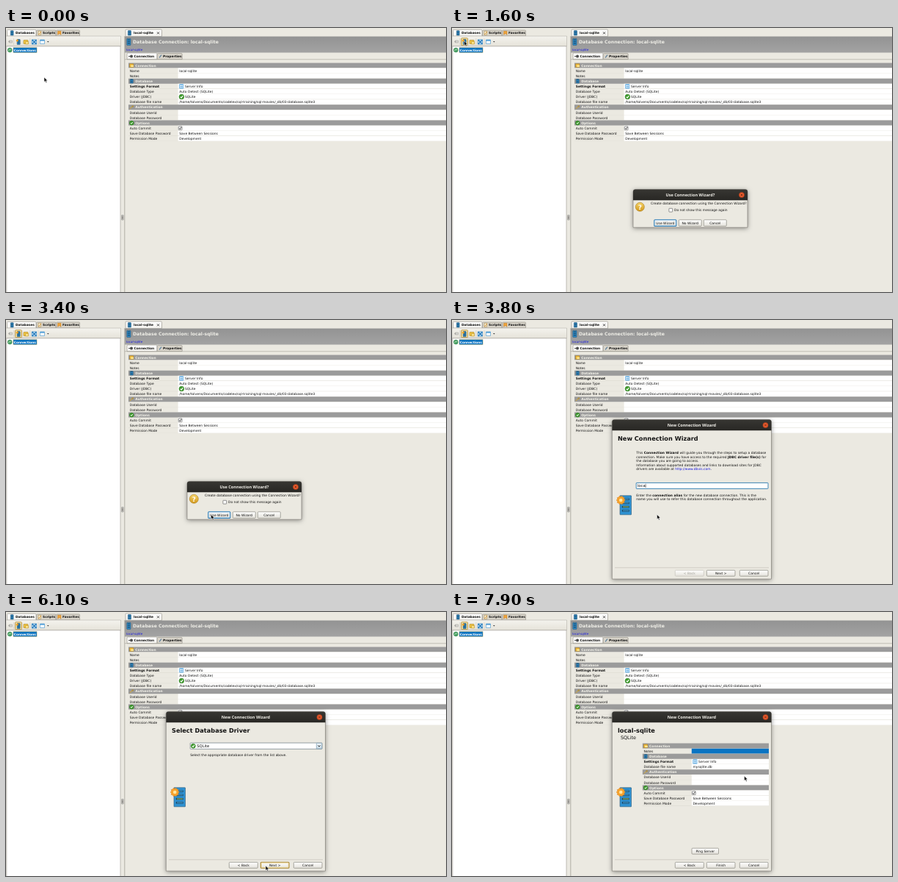
Recreate the animation shown at these times as an HTML page with a canvas. Size 600 by 359 pixels, loop 8000 ms.

```html
<!DOCTYPE html>
<html lang="en">
<head>
<meta charset="utf-8">
<title>New connection wizard</title>
<style>
  html, body { margin: 0; width: 100%; height: 100%; overflow: hidden; background: #ebe9e1; }
  canvas { display: block; width: 600px; height: 359px; }
</style>
</head>
<body>
<canvas id="stage"></canvas>
<script>
const W = 600, H = 359, LOOP = 8000, STEP = 100;
const SANS = '"DejaVu Sans", sans-serif';
const TITLE = '"Noto Sans", "Open Sans", sans-serif';
const BODY = 4.46, TAB = 4.35;
const PANEL = '#ebe9e1', LINE = '#aaa79e', SELECT = '#0a73c2';
const ROW = 7.11;

const canvas = document.getElementById('stage');
const ctx = canvas.getContext('2d');
const dpr = window.devicePixelRatio || 1;
canvas.width = W * dpr;
canvas.height = H * dpr;
ctx.scale(dpr, dpr);

function box(x, y, w, h, fill, stroke, radius = 0, lineWidth = .6) {
  ctx.beginPath();
  ctx.roundRect(x, y, w, h, radius);
  if (fill) { ctx.fillStyle = fill; ctx.fill(); }
  if (stroke) { ctx.strokeStyle = stroke; ctx.lineWidth = lineWidth; ctx.stroke(); }
}

function disc(x, y, r, fill, stroke) {
  ctx.beginPath();
  ctx.arc(x, y, r, 0, 2 * Math.PI);
  ctx.fillStyle = fill;
  ctx.fill();
  if (stroke) { ctx.strokeStyle = stroke; ctx.lineWidth = .6; ctx.stroke(); }
}

function path(points, color, lineWidth = .8, fill) {
  ctx.beginPath();
  points.forEach(([x, y]) => ctx.lineTo(x, y));
  if (fill) { ctx.closePath(); ctx.fillStyle = fill; ctx.fill(); }
  if (color) { ctx.strokeStyle = color; ctx.lineWidth = lineWidth; ctx.stroke(); }
}

function vertical(y0, y1, ...colors) {
  const g = ctx.createLinearGradient(0, y0, 0, y1);
  colors.forEach((c, i) => g.addColorStop(i / (colors.length - 1), c));
  return g;
}

// y is the middle of the capitals; small type is laid out large for even spacing
function text(str, x, y, { size = BODY, color = '#111', style = '', family = SANS, align = 'left' } = {}) {
  const zoom = 10;
  ctx.save();
  ctx.translate(x, y + size * .365);
  ctx.scale(1 / zoom, 1 / zoom);
  ctx.font = `${style} ${size * zoom}px ${family}`;
  ctx.textRendering = 'geometricPrecision';
  ctx.textAlign = align;
  ctx.fillStyle = color;
  ctx.fillText(str, 0, 0);
  const width = ctx.measureText(str).width / zoom;
  ctx.restore();
  return width;
}

// *bold* and _link_ spans
function rich(str, x, y) {
  for (const part of str.split(/(\*[^*]+\*|_[^_]+_)/)) {
    const mark = part[0];
    const marked = mark === '*' || mark === '_';
    x += text(marked ? part.slice(1, -1) : part, x, y, {
      style: mark === '*' ? 'bold' : '', color: mark === '_' ? '#1414e0' : '#111'
    });
  }
}

function check(x, y, r) {
  disc(x, y, r, '#3d9b2c', '#2a7a1d');
  path([[x - r * .5, y], [x - r * .1, y + r * .45], [x + r * .55, y - r * .45]], '#fff', r * .35);
}

function checkbox(x, y, checked) {
  box(x - 2.4, y - 2.4, 4.8, 4.8, '#fff', '#666', .5, .7);
  if (checked) path([[x - 1.4, y], [x - .3, y + 1.3], [x + 1.7, y - 1.6]], '#222', .9);
}

function server(x, y, w, h, bars = 3) {
  box(x, y, w, h, '#2f92d2', '#2b5673', .5);
  for (let i = 0; i < bars; i++) {
    box(x + w * .18, y + h * (.14 + i * .8 / bars), w * .64, h * .4 / bars, '#1c4766');
  }
}

function listIcon(x, y) {
  box(x - 2.6, y - 2.7, 5.2, 5.4, '#fff', '#3b98dc', 0, .7);
  for (let i = -1; i < 2; i++) box(x - 1.8, y + i * 1.7 - .4, 3.6, .8, '#3f9add');
}

function sectionIcon(name, x, y) {
  if (name === 'Options') return check(x, y, 2.8);
  if (name === 'Database') return server(x - 2, y - 2.7, 4, 5.4);
  if (name === 'Connection') {
    box(x - 2.7, y - 2.2, 5.2, 4.5, '#f0bc3d', '#ad8020');
    return box(x - 1, y - .3, 3.6, 2.2, '#ffe999');
  }
  path([[x - 2.5, y + 2], [x + 1, y - 1]], '#c7a44a', 1.1);
  disc(x + 1.5, y - 1.4, 1.3, '#ad9147');
}

function button(label, x, y, w, h, mode) {
  const edge = { focus: '#2879b4', hover: '#a8842f', off: '#c8c5bd' }[mode] || '#8a8880';
  const strong = mode === 'focus' || mode === 'hover';
  box(x, y, w, h, vertical(y, y + h, '#fff', '#e3e1da'), edge, 1, strong ? 1.1 : .7);
  if (strong) box(x + 1, y + 1, w - 2, h - 2, null, mode === 'focus' ? '#a8cfe8' : '#efd079', .5);
  text(label, x + w / 2, y + h / 2, { align: 'center', color: mode === 'off' ? '#a5a39c' : '#111' });
}

function tab(label, x, y, w, h, active, labelX) {
  box(x, y, w, h, active ? vertical(y, y + h, '#fff', '#f4f3ef') : '#d9d5cb', '#8d8a82', [1.2, 1.2, 0, 0]);
  text(label, labelX, y + h / 2, { size: TAB, style: 'bold' });
}

// Each row is [label, value, kind]; a row with only a name is a section
function sheet(rows, x, y, split, right) {
  box(x, y, right - x, rows.length * ROW, PANEL);
  rows.forEach(([label, value, kind], i) => {
    const top = y + i * ROW, mid = top + ROW / 2;
    if (value === undefined) {
      box(x, top, right - x, ROW - .2, '#9b9b9b');
      sectionIcon(label, x + 4.3, mid);
      text(label, x + 9.3, mid, { style: 'bold', color: '#f2f1e9' });
      return;
    }
    box(split, top, right - split, ROW, kind === 'selected' ? SELECT : '#fff');
    box(x, top + ROW - .35, right - x, .35, '#dad7ce');
    text(label, x + 1.7, mid, { style: kind === 'list' ? 'bold' : '' });
    let valueX = split + 1.6;
    if (kind === 'list') { listIcon(split + 4.6, mid); valueX = split + 9.3; }
    if (kind === 'driver') { check(split + 4.8, mid, 3.3); valueX = split + 9.3; }
    if (kind === 'check') checkbox(split + 3, mid, true);
    text(value, valueX, mid);
  });
  box(split - .6, y, .5, 0, LINE);
}

const AUTH = [['Authentication'], ['Database Userid', ''], ['Database Password', '']];
const OPTIONS = [
  ['Options'], ['Auto Commit', '', 'check'],
  ['Save Database Password', 'Save Between Sessions'], ['Permission Mode', 'Development']
];
const MAIN_ROWS = [
  ['Connection'], ['Name', 'local-sqlite'], ['Notes', ''],
  ['Database'], ['Settings Format', 'Server Info', 'list'],
  ['Database Type', 'Auto Detect (SQLite)'], ['Driver (JDBC)', 'SQLite', 'driver'],
  ['Database file name', '/home/tolvens/Documents/codelex/sql-training/sql-movies/_db/03-database.sqlite3'],
  ...AUTH, ...OPTIONS
];
const WIZARD_ROWS = [
  ['Connection'], ['Notes', '', 'selected'],
  ['Database'], ['Settings Format', 'Server Info', 'list'], ['Database file name', 'mysqlite.db'],
  ...AUTH, ...OPTIONS
];

function toolbar(pressed) {
  path([[3, 18.5], [5, 16.5], [5, 20.5]], null, 0, '#aaa9a4');
  box(5, 17, 3.5, 3, '#d9d8d3', '#aaa9a4');
  path([[10.5, 14], [10.5, 23]], '#c4c1b8', .5);
  if (pressed) box(12.5, 13.7, 9, 10, '#f2dfa4', '#b18b38', 1, .8);
  server(15.2, 15.5, 4, 7);
  disc(15.3, 17, 1.6, '#f0a020');
  box(24, 16.5, 6, 5, '#f2c640', '#a98422', .5);
  box(26.5, 18.5, 4, 3.5, '#ffe58a', '#b68e29');
  path([[32.8, 14], [32.8, 23]], '#c4c1b8', .5);
  box(35.4, 16, 6, 6, '#d6ecfb', '#2f86c6', 0, .8);
  path([[35.5, 16], [41.5, 22]], '#1f74b8', 1.1);
  path([[41.5, 16], [35.5, 22]], '#1f74b8', 1.1);
  path([[44, 14], [44, 23]], '#c4c1b8', .5);
  box(46.5, 16, 6, 5.5, '#fff', '#5a9fd0', 0, .7);
  box(46.5, 16, 6, 1.6, '#4b9bd6');
  path([[56, 18], [58.6, 18], [57.3, 19.5]], null, 0, '#333');
}

function leftPane(pressed) {
  tab('Databases', 1.5, 2.3, 39.5, 8.9, true, 13);
  server(6.3, 3.7, 3.8, 6.3);
  tab('Scripts', 41.5, 3, 26.5, 7.8, false, 50);
  box(44, 4.3, 3.6, 5, '#f4ecd2', '#b18a42');
  path([[44.5, 8.7], [48, 5]], '#d38a28', .9);
  tab('Favorites', 68.5, 3, 32, 7.8, false, 77);
  path([[70.5, 4.3], [75, 4.3], [75, 9.3], [72.8, 7.6], [70.5, 9.3]], '#bb7924', .5, '#f0a43a');
  box(0, 11, 156.5, 13.8, vertical(11, 25, '#f4f3ee', '#e5e2d9'), LINE, 0, .5);
  toolbar(pressed);
  box(.8, 24.8, 155.2, 336, '#fff', '#98958d');
  disc(5.3, 30, 2.9, '#4da567', '#2d7e49');
  path([[3.2, 31], [5, 29], [7.2, 29.4]], '#c4e5cb', .8);
  box(9.9, 26.6, 32.2, 6.9, SELECT, '#e0b04c', 0, .4);
  text('Connections', 10.8, 30, { size: TAB, style: 'bold', color: '#fff' });
  box(157.7, 254.5, 2.4, 6.5, '#d8d5cc', '#888');
  path([[158.9, 255.8], [158.9, 259.8]], '#444', .7);
}

function rightPane() {
  path([[161.8, 11], [161.8, H]], '#98958d', .7);
  tab('local-sqlite', 163, 2, 49.5, 9.4, true, 174);
  server(166.3, 3.6, 4.2, 6.4);
  path([[206, 5.3], [209, 8.3]], '#222', .8);
  path([[209, 5.3], [206, 8.3]], '#222', .8);
  box(162, 11.5, 438, 21.9, vertical(11.5, 33.4, '#939393', '#a3a3a3'));
  server(164.8, 14.4, 5.2, 9);
  text('Database Connection: local-sqlite', 173, 19.2, { size: 6.17, style: 'bold', color: '#eeede6' });
  text('local-sqlite', 164, 29.6, { size: 4.1, color: '#1414e6', style: 'italic' });
  tab('Connection', 165, 34, 41, 8.7, true, 174.6);
  disc(171, 38.5, 2, '#4b4b4b');
  path([[167, 38.5], [169.5, 38.5]], '#555', 1);
  tab('Properties', 206.2, 34.6, 34, 8, false, 214);
  path([[209, 40.3], [212, 36.7]], '#5a7d99', 1.2);
  path([[162, 42.7], [600, 42.7]], '#99968d', .5);
  sheet(MAIN_ROWS, 167, 47.4, 234.6, 600);
}

function frame(title, x, y, w, h) {
  ctx.save();
  ctx.shadowColor = 'rgba(0,0,0,.45)';
  ctx.shadowBlur = 6 * dpr;
  ctx.shadowOffsetY = 1.2 * dpr;
  box(x, y, w, h, PANEL, null, [3, 3, 0, 0]);
  ctx.restore();
  box(x, y, w, h, null, '#77746c', [3, 3, 0, 0]);
  box(x, y, w, 14.6, vertical(y, y + 14, '#373632', '#292825'), null, [3, 3, 0, 0]);
  text(title, x + w / 2, y + 7.4, { size: 5.6, style: 'bold', family: TITLE, color: '#f0eee8', align: 'center' });
  const cx = x + w - 8, cy = y + 7.4;
  disc(cx, cy, 3.6, '#e4592c', '#a63c1c');
  path([[cx - 1.2, cy - 1.2], [cx + 1.2, cy + 1.2]], '#4a1f10', .6);
  path([[cx + 1.2, cy - 1.2], [cx - 1.2, cy + 1.2]], '#4a1f10', .6);
}

function prompt() {
  frame('Use Connection Wizard?', 247, 219.6, 156, 51.6);
  disc(256.3, 243.3, 6, vertical(237, 249, '#f6d66c', '#d39a1e'), '#a97917');
  text('?', 256.3, 243.4, { size: 9, style: 'bold', color: '#fff', align: 'center' });
  text('Create database connection using the Connection Wizard?', 271, 238.5);
  checkbox(298.3, 247.7, false);
  text('Do not show this message again', 303, 247.8);
  button('Use Wizard', 275.8, 260.8, 30, 8.7, 'focus');
  button('No Wizard', 309.3, 260.8, 31, 8.7);
  button('Cancel', 343.3, 260.8, 31, 8.7);
}

function wizardIcon() {
  server(229, 238.8, 15.5, 26, 4);
  for (let i = 0; i < 4; i++) box(233, 243.2 + i * 5.2, 8, .9, i === 2 ? '#b8cf48' : '#4fb3e8');
  const star = Array.from({ length: 20 }, (_, i) => {
    const a = i * Math.PI / 10, r = i % 2 ? 4.8 : 6;
    return [230.2 + r * Math.cos(a), 245 + r * Math.sin(a)];
  });
  path(star, '#d9801a', .5, '#f7a22c');
  disc(230.2, 245, 2.3, '#ffe6a0');
}

function namePage(typed) {
  [
    'This *Connection Wizard* will guide you through the steps to setup a database',
    'connection. Make sure you have access to the required *JDBC driver file(s)* for',
    'the database you are going to access.',
    'Information about supported databases and links to download sites for JDBC',
    'drivers are available at _http://www.dbvis.com_.'
  ].forEach((line, i) => rich(line, 251.2, 180.5 + i * 5.5));
  box(251.2, 221.4, 179.8, 8, '#fff', '#3f86b5', .5, 1);
  const width = text(typed, 252.8, 225.5, { size: 5.3 });
  path([[253.3 + width, 222.8], [253.3 + width, 228]], '#111', .5);
  rich('Enter the *connection alias* for the new database connection. This is the', 251.2, 238.2);
  rich('name you will use to refer this database connection throughout the application.', 251.2, 243.8);
}

function driverPage() {
  box(251.2, 178, 179.8, 8.3, '#fff', '#7d8890', .5, .8);
  check(255.3, 182.2, 3);
  text('SQLite', 260.3, 182.3, { size: 5.2 });
  box(423.3, 178.3, 7.4, 7.7, vertical(178, 186, '#f2f7fa', '#c5d7e3'), '#6b90a9', .5);
  path([[425.4, 181.3], [427, 183.1], [428.6, 181.3]], '#222', .9);
  text('Select the appropriate database driver from the list above.', 251.2, 194.6);
}

function settingsPage() {
  text('SQLite', 230, 171, { size: 6.4 });
  sheet(WIZARD_ROWS, 259.8, 178.6, 326.8, 432);
  button('Ping Server', 327, 321.2, 36.5, 8);
}

function wizard(page, typed, hover) {
  const heading = ['New Connection Wizard', 'Select Database Driver', 'local-sqlite'][page];
  frame('New Connection Wizard', 218.3, 135.6, 217.2, 216.6);
  text(heading, 226, 160.8, { size: 8.2, style: 'bold' });
  [() => namePage(typed), driverPage, settingsPage][page]();
  wizardIcon();
  path([[222, 336.8], [432, 336.8]], '#bbb8af', .6);
  button('< Back', 304.3, 340.3, 39, 8, page ? '' : 'off');
  button(page === 2 ? 'Finish' : 'Next >', 347.3, 340.3, 38.7, 8, hover ? 'hover' : '');
  button('Cancel', 392.3, 340.3, 38.7, 8);
}

const POINTER = [
  [0, 52, 67], [100, 52, 67], [900, 16.5, 17.5], [1800, 16.5, 17.5], [2700, 258, 248],
  [3000, 279.5, 264.5], [4100, 279.5, 264.5], [4500, 344, 315], [4700, 352.5, 336.5],
  [4900, 354, 345], [7400, 354, 345], [7900, 398.5, 223]
];

function pointerAt(t) {
  const next = POINTER.findIndex(([time]) => time > t);
  if (next < 0) return POINTER[POINTER.length - 1].slice(1);
  const [t0, x0, y0] = POINTER[next - 1], [t1, x1, y1] = POINTER[next];
  const k = (t - t0) / (t1 - t0), ease = k * k * (3 - 2 * k);
  return [x0 + (x1 - x0) * ease, y0 + (y1 - y0) * ease];
}

function cursor(x, y) {
  const outline = [[0, 0], [0, 6.4], [1.5, 5.1], [2.6, 7.4], [3.7, 6.9], [2.7, 4.7], [4.6, 4.5]];
  path(outline.map(([dx, dy]) => [x + dx, y + dy]), '#fff', .5, '#111');
}

function draw(t) {
  box(0, 0, W, H, PANEL);
  leftPane(t >= 900);
  rightPane();
  if (t >= 1400 && t < 3500) prompt();
  if (t >= 3500) {
    const page = t < 5300 ? 0 : t < 6700 ? 1 : 2;
    const letters = Math.max(0, Math.floor((t - 3600) / 50));
    wizard(page, 'local-sqlite'.slice(0, letters), t >= 4900 && t < 7500);
  }
  cursor(...pointerAt(t));
}

let shown = -1;
function tick() {
  const t = Math.floor(performance.now() % LOOP / STEP) * STEP;
  if (t !== shown) draw(shown = t);
  requestAnimationFrame(tick);
}
tick();
</script>
</body>
</html>
```
